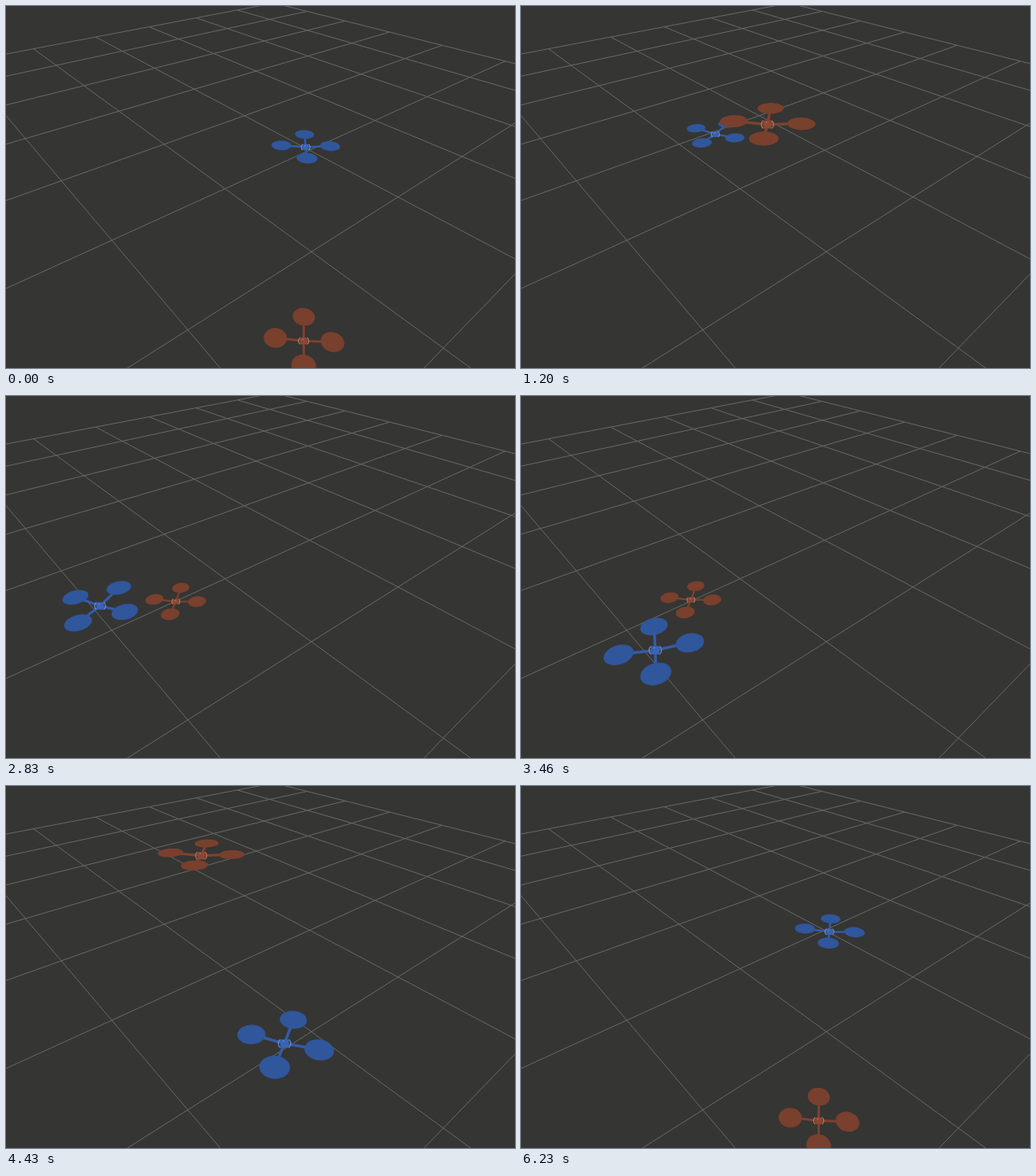
An HTML page with a canvas that plays this animation: 625 by 445 pixels, repeating every 6260 ms.

```html
<!DOCTYPE html>
<html lang="en">
<head>
<meta charset="utf-8">
<title>Two drones</title>
<style>
html, body { margin: 0; width: 100%; height: 100%; overflow: hidden; background: #353533; }
canvas { display: block; width: 625px; height: 445px; }
</style>
</head>
<body>
<canvas id="stage" width="625" height="445"></canvas>
<script>
const ctx = document.getElementById('stage').getContext('2d');
const LOOP = 6260, STEP = 33.35, RAD = Math.PI / 180;
const ARM = 0.232, ROTOR = 0.095;
const RED = { rotor: '#78402d', arm: '#7e422e', body: '#8a4833', light: '#b87662' };
const BLUE = { rotor: '#30569c', arm: '#345ba8', body: '#3a63b2', light: '#6c8dd0' };

// Flight angle in degrees at given times (ms)
const PHASE = [[0, 3], [1200, 68], [2230, 127], [3460, 198.6], [4430, 256.5], [5300, 305.7], [6230, 356.3]];
// Intervals during which the picture rests
const HOLDS = [[0, 60], [5060, 5130], [5300, 5400]];

const depth = ([x, y, z]) => 1 + 0.1455 * x + 0.1728 * y - 0.1547 * z;

function project(p) {
  const [x, y, z] = p, w = depth(p);
  return [
    (269 + 158 * x - 41.2 * y - 48.7 * z) / w,
    (224.6 - 21.5 * x - 25.3 * y - 156.2 * z) / w
  ];
}

function snap(t) {
  const hold = HOLDS.find(h => t >= h[0] && t < h[1]);
  return hold ? hold[0] : Math.floor((t + 9) / STEP) * STEP;
}

function phaseAt(t) {
  let i = 0;
  while (i < PHASE.length - 2 && t > PHASE[i + 1][0]) i++;
  const [t0, a] = PHASE[i], [t1, b] = PHASE[i + 1];
  return (a + (b - a) * Math.min(1, (t - t0) / (t1 - t0))) * RAD;
}

function line(a, b, color, width) {
  ctx.strokeStyle = color;
  ctx.lineWidth = width;
  ctx.beginPath();
  ctx.moveTo(...project(a));
  ctx.lineTo(...project(b));
  ctx.stroke();
}

// Floor line, cut where it would pass behind the camera
function floorLine(a, b) {
  const near = 0.1, wa = depth(a), wb = depth(b);
  if (wb <= near) return;
  if (wa < near) {
    const k = (near - wa) / (wb - wa);
    a = a.map((v, i) => v + (b[i] - v) * k);
  }
  line(a, b, '#676a64', 1);
}

function disc([x, y, z], r, color) {
  ctx.fillStyle = color;
  ctx.beginPath();
  for (let i = 0; i < 36; i++) {
    const a = i * 10 * RAD;
    ctx.lineTo(...project([x + r * Math.cos(a), y + r * Math.sin(a), z]));
  }
  ctx.fill();
}

function drone({ pos, yaw, look }) {
  const [x, y, z] = pos;
  const unit = 147.4 / depth(pos);
  const hub = [x, y, z + 0.012];
  const tips = [0, 1, 2, 3].map(i => {
    const a = yaw + (45 + 90 * i) * RAD;
    return [x + ARM * Math.cos(a), y + ARM * Math.sin(a), z + 0.028];
  });
  tips.forEach(tip => line(hub, tip, look.arm, unit * 0.019));
  tips.sort((a, b) => depth(b) - depth(a)).forEach(tip => disc(tip, ROTOR, look.rotor));

  const [u, v] = project(hub), s = unit * 0.028;
  ctx.fillStyle = look.body;
  ctx.fillRect(u - s, v - s, 2 * s, 2 * s);
  ctx.strokeStyle = look.light;
  ctx.lineWidth = 1.2;
  for (const side of [0, Math.PI]) {
    ctx.beginPath();
    ctx.ellipse(u, v, unit * 0.042, unit * 0.038, 0, side - 0.8, side + 0.8);
    ctx.stroke();
  }
  ctx.fillStyle = look.light;
  ctx.fillRect(u - s * 0.4, v - s * 0.7, 1.5, 1.5);
}

function draw(t) {
  ctx.fillStyle = '#353533';
  ctx.fillRect(0, 0, 625, 445);
  for (let i = -5; i <= 5; i++) {
    floorLine([i, -5, 0], [i, 5, 0]);
    floorLine([-5, i, 0], [5, i, 0]);
  }
  const a = phaseAt(snap(t));
  [
    { pos: [Math.cos(a), Math.sin(a), 0], yaw: a, look: BLUE },
    { pos: [0, -Math.cos(a), -Math.cos(2 * a)], yaw: 0, look: RED }
  ].sort((p, q) => depth(q.pos) - depth(p.pos)).forEach(drone);
}

const start = performance.now();
function tick() {
  draw((performance.now() - start) % LOOP);
  requestAnimationFrame(tick);
}
tick();
</script>
</body>
</html>
```
